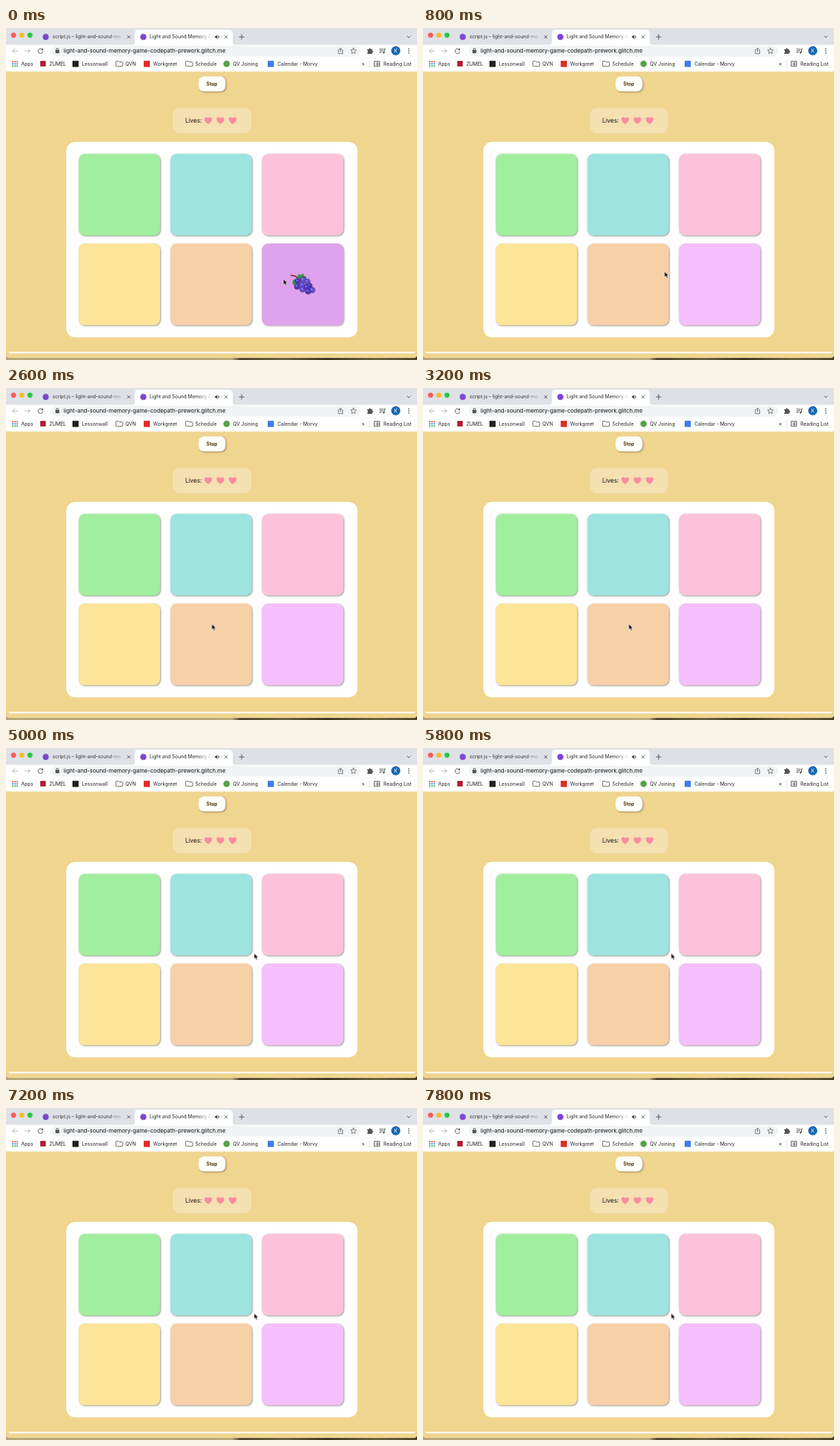
These frames come from a looping animation (600 by 484 pixels, 8 s). An HTML page:

```html
<!DOCTYPE html>
<html lang="en">
<head>
<meta charset="utf-8">
<title>Memory game</title>
<style>
  html, body { margin: 0; width: 100%; height: 100%; overflow: hidden; background: #f0d58f; }
  svg { display: block; width: 100vw; height: 100vh; }
  text { font-family: Inter, "Open Sans", sans-serif; fill: #111; white-space: pre; }
  .tabs text { font-size: 7px; }
  .bookmarks text { font-size: 7.1px; fill: #222; }
  .line { fill: none; stroke: #50545a; stroke-width: 1; stroke-linecap: round; stroke-linejoin: round; }
  .faint { stroke: #b5b8bc; }
  .raised { filter: drop-shadow(1.4px 1.6px 1px rgba(60, 45, 30, .5)); }
  .purple, .orange { animation: 8s step-end infinite; }
  .purple { animation-name: purple; }
  .orange { animation-name: orange; }
  .cursor { animation: cursor 8s infinite; }

  @keyframes purple {
    0% { opacity: 1; }
    5% { opacity: 0; }
    77.5% { opacity: 1; }
    90%, 100% { opacity: 0; }
  }
  @keyframes orange {
    0% { opacity: 0; }
    17.5% { opacity: 1; }
    25%, 100% { opacity: 0; }
  }
  @keyframes cursor {
    0%, 5% { transform: translate(405px, 366px); animation-timing-function: ease-in-out; }
    15%, 42.5% { transform: translate(300.5px, 344px); animation-timing-function: ease-in-out; }
    55%, 100% { transform: translate(362.3px, 299.3px); }
  }
</style>
</head>
<body>
<svg viewBox="0 0 600 484" preserveAspectRatio="none">
  <defs>
    <linearGradient id="fadeLeft" gradientUnits="userSpaceOnUse" x1="150" x2="172">
      <stop stop-color="#333"/><stop offset="1" stop-color="#333" stop-opacity="0"/>
    </linearGradient>
    <linearGradient id="fadeRight" gradientUnits="userSpaceOnUse" x1="280" x2="301">
      <stop stop-color="#222"/><stop offset="1" stop-color="#222" stop-opacity="0"/>
    </linearGradient>
    <linearGradient id="desk">
      <stop stop-color="#b7a57c"/><stop offset=".55" stop-color="#b7a57c"/>
      <stop offset=".57" stop-color="#4a4230"/><stop offset=".68" stop-color="#6b5f42"/>
      <stop offset=".78" stop-color="#39341f"/><stop offset=".9" stop-color="#6d6040"/>
      <stop offset="1" stop-color="#4b432f"/>
    </linearGradient>
    <path id="heart" d="M0 5.2C-3 2.8-5.6.7-5.6-2A2.9 2.9 0 0 1 0-3.2 2.9 2.9 0 0 1 5.6-2C5.6.7 3 2.8 0 5.2Z" fill="#fb8ba0"/>
    <path id="close" class="line" d="m-2-2 4 4m0-4-4 4"/>
    <path id="folder" d="M0 1.3Q0 .5.8.5H3.7L4.8 1.7H9.2Q10 1.7 10 2.5V7.2Q10 8 9.2 8H.8Q0 8 0 7.2Z" fill="none" stroke="#5f6368"/>
    <circle id="grape" r="4.1" stroke="#56306f" stroke-width=".7"/>
  </defs>

  <rect y="478" width="600" height="6" fill="url(#desk)"/>
  <path d="M0 60H600V476Q600 481 595 481H5Q0 481 0 476Z" fill="#f0d58f"/>
  <path d="M5 473.2H596" stroke="#fffdf7" stroke-width="2.2" stroke-linecap="round"/>

  <g class="tabs">
    <rect width="600" height="25" fill="#dee1e5"/>
    <circle cx="11" cy="10.5" r="3.7" fill="#fc5b54"/>
    <circle cx="23" cy="10.5" r="3.7" fill="#f9bb2e"/>
    <circle cx="35" cy="10.5" r="3.7" fill="#29c840"/>
    <path d="M183 25Q188 25 188 20V8Q188 2.5 194 2.5H325Q331 2.5 331 8V20Q331 25 336 25Z" fill="#fff"/>
    <circle cx="58" cy="13" r="4.5" fill="#7d45d5"/>
    <text x="68" y="15.3" fill="url(#fadeLeft)" style="fill:url(#fadeLeft)">script.js – light-and-sound-me</text>
    <use href="#close" x="179.3" y="13"/>
    <circle cx="200.5" cy="13" r="4.5" fill="#7d45d5"/>
    <text x="209.7" y="15.3" style="fill:url(#fadeRight)">Light and Sound Memory G</text>
    <path d="M305 11.8h1.6l2-1.9v6.2l-2-1.9H305Z" fill="#444"/>
    <path class="line" d="M310.2 11.3q1.4 1.7 0 3.4" stroke-width=".8"/>
    <use href="#close" x="321.3" y="13"/>
    <path class="line" d="M340.5 13h7m-3.5-3.5v7M585.7 11.8l2.3 2.3 2.3-2.3"/>
  </g>

  <rect y="24.5" width="600" height="39" fill="#fff"/>
  <rect x="67" y="25.7" width="451" height="15.8" rx="7.9" fill="#f1f3f4"/>
  <g class="line">
    <path class="faint" d="M17 33.5H9.5m3.4-3.4-3.4 3.4 3.4 3.4M27.5 33.5H35m-3.4-3.4 3.4 3.4-3.4 3.4"/>
    <path d="M53 31.4A3.5 3.5 0 1 0 53.8 34.5M53.6 29.8v2.1h-2.2"/>
    <path d="M73.4 32.5v-1.3a1.6 1.6 0 0 1 3.2 0v1.3"/>
    <path d="M486.5 32h-1.3v5.3h6.3V32h-1.3m-1.8 2.8v-5.5m-1.7 1.6 1.7-1.7 1.7 1.7" stroke-width=".8"/>
    <path d="m507.2 29.2 1.25 2.7 2.95.35-2.2 2 .6 2.95-2.6-1.5-2.6 1.5.6-2.95-2.2-2 2.95-.35Z" stroke-width=".8"/>
    <path d="M545.5 30.8h5.2m-5.2 2.3h5.2m-5.2 2.3h2.7m4.2-.3v-4.6h1.5"/>
  </g>
  <rect x="72.2" y="32" width="5.6" height="4.8" rx=".7" fill="#50545a"/>
  <circle cx="551.3" cy="35.8" r="1.4" fill="#50545a"/>
  <path d="M527.5 31h2.2a1.4 1.4 0 0 1 2.8 0h2.1v2.2a1.4 1.4 0 0 1 0 2.8v1.7h-7.1v-2a1.4 1.4 0 0 0 0-2.7Z" fill="#50545a"/>
  <text x="84" y="36.4" font-size="8.2">light-and-sound-memory-game-codepath-prework.glitch.me</text>
  <circle cx="569" cy="33.2" r="6.6" fill="#1668b3"/>
  <text x="569" y="35.8" font-size="7" text-anchor="middle" style="fill:#fff">K</text>
  <g fill="#555">
    <circle cx="588" cy="30.4" r=".9"/><circle cx="588" cy="33.4" r=".9"/><circle cx="588" cy="36.4" r=".9"/>
  </g>

  <g class="bookmarks">
    <g fill="none" stroke-width="2" stroke-dasharray="2 1.2">
      <path d="M9 49.2h8.4" stroke="#e24a3b"/>
      <path d="M9 52.3h8.4" stroke="#4286e8"/>
      <path d="M9 55.4h8.4" stroke="#36a354"/>
    </g>
    <rect x="50" y="48" width="8" height="8" fill="#b01f2e"/>
    <rect x="97" y="47.8" width="9" height="9" fill="#222"/>
    <use href="#folder" x="160.3" y="47.8"/>
    <rect x="201" y="47.8" width="9" height="9" fill="#e42a27"/>
    <use href="#folder" x="262.3" y="47.8"/>
    <circle cx="322" cy="52.3" r="4.7" fill="#52a447"/>
    <rect x="382" y="47.8" width="9" height="9" fill="#3b7ded"/>
    <text x="22.3" y="54.8">Apps</text>
    <text x="63.3" y="54.8">ZUMEL</text>
    <text x="110.8" y="54.8">Lessonwall</text>
    <text x="174.3" y="54.8">QVN</text>
    <text x="214.8" y="54.8">Workgreet</text>
    <text x="276.2" y="54.8">Schedule</text>
    <text x="331.3" y="54.8">QV Joining</text>
    <text x="396.2" y="54.8">Calendar - Morvy</text>
    <text x="519.5" y="54.6">»</text>
    <path d="M530.5 47v11" stroke="#d5d8dc" stroke-width=".8"/>
    <path class="line" d="M537.8 48.6h7.8v7.2h-7.8Zm2 2.2h.2m1.5 0h2.2m-3.9 1.6h.2m1.5 0h2.2m-3.9 1.6h.2m1.5 0h2.2" stroke-width=".8"/>
    <text x="551" y="54.8">Reading List</text>
  </g>

  <rect class="raised" x="281" y="70.5" width="39.5" height="22" rx="8" fill="#fffefa"/>
  <text x="300.5" y="84.2" font-size="7.1" font-weight="700" text-anchor="middle" style="fill:#4d340d">Stop</text>
  <rect x="243.5" y="116.5" width="114.5" height="37.3" rx="11" fill="#f4e0b1"/>
  <text x="261.7" y="138.2" font-size="8.8">Lives:</text>
  <use href="#heart" x="295.2" y="135"/>
  <use href="#heart" x="313" y="135"/>
  <use href="#heart" x="330.8" y="135"/>

  <rect x="88" y="166" width="425" height="285" rx="13" fill="#fefefe"/>
  <g id="tiles"></g>

  <g class="orange">
    <rect x="239.7" y="314.3" width="119" height="119" rx="9" fill="#fac685"/>
    <ellipse cx="299.2" cy="373.8" rx="14.3" ry="12.9" fill="#f99a05"/>
    <path d="M298.5 363v-3.6l2.2-.2.3 3.5Z" fill="#3c4a22"/>
    <path d="M299 362.8C301 358.3 308 357.5 314 361.2 309.5 366 303.5 366.4 299 362.8Z" fill="#2f9a49"/>
    <path d="M300.5 362.6Q306 360.6 312 361.3" fill="none" stroke="#17642f" stroke-width=".7"/>
  </g>

  <g class="purple">
    <rect x="373.7" y="314.3" width="119" height="119" rx="9" fill="#dfa2ec"/>
    <path d="M416 360.3Q424 361 430 368" fill="none" stroke="#703b25" stroke-width="1.8" stroke-linecap="round"/>
    <path d="M425 364l2-5 4 1 3-2.5 1.2 4 4 1.2-4 4.3-6 1ZM418 372l1-5 4-1 4 2-1 5-6 2Z" fill="#329648"/>
    <g id="grapes"></g>
  </g>

  <path class="cursor" d="M0 0V8.2L1.9 6.5 3.2 9.5 4.8 8.8 3.5 5.9H6Z" fill="#111" stroke="#fff" stroke-width=".6" stroke-linejoin="round"/>
</svg>
<script>
  const add = (parent, name, attributes) => {
    const node = document.createElementNS('http://www.w3.org/2000/svg', name);
    for (const key in attributes) node.setAttribute(key, attributes[key]);
    document.getElementById(parent).append(node);
  };

  ['#a2ee9f', '#9de4e1', '#fbc2da', '#fce499', '#f6d0a7', '#f4bffc'].forEach((fill, i) =>
    add('tiles', 'rect', {
      class: 'raised', fill, rx: 9, width: 119, height: 119,
      x: 106 + (i % 3) * 133.8, y: 183.5 + Math.floor(i / 3) * 130.8
    }));

  const bunch = [[434, 367], [426, 369], [440, 370], [425, 377], [432, 375],
    [443, 376], [433, 381], [439, 378], [447, 382], [441, 384]];
  bunch.forEach(([x, y], i) => {
    add('grapes', 'use', { href: '#grape', x, y, fill: i % 2 ? '#4b38c4' : '#6150d6' });
    add('grapes', 'circle', { cx: x - 1, cy: y - 1.2, r: 1.1, fill: '#978cf0' });
  });
</script>
</body>
</html>
```
